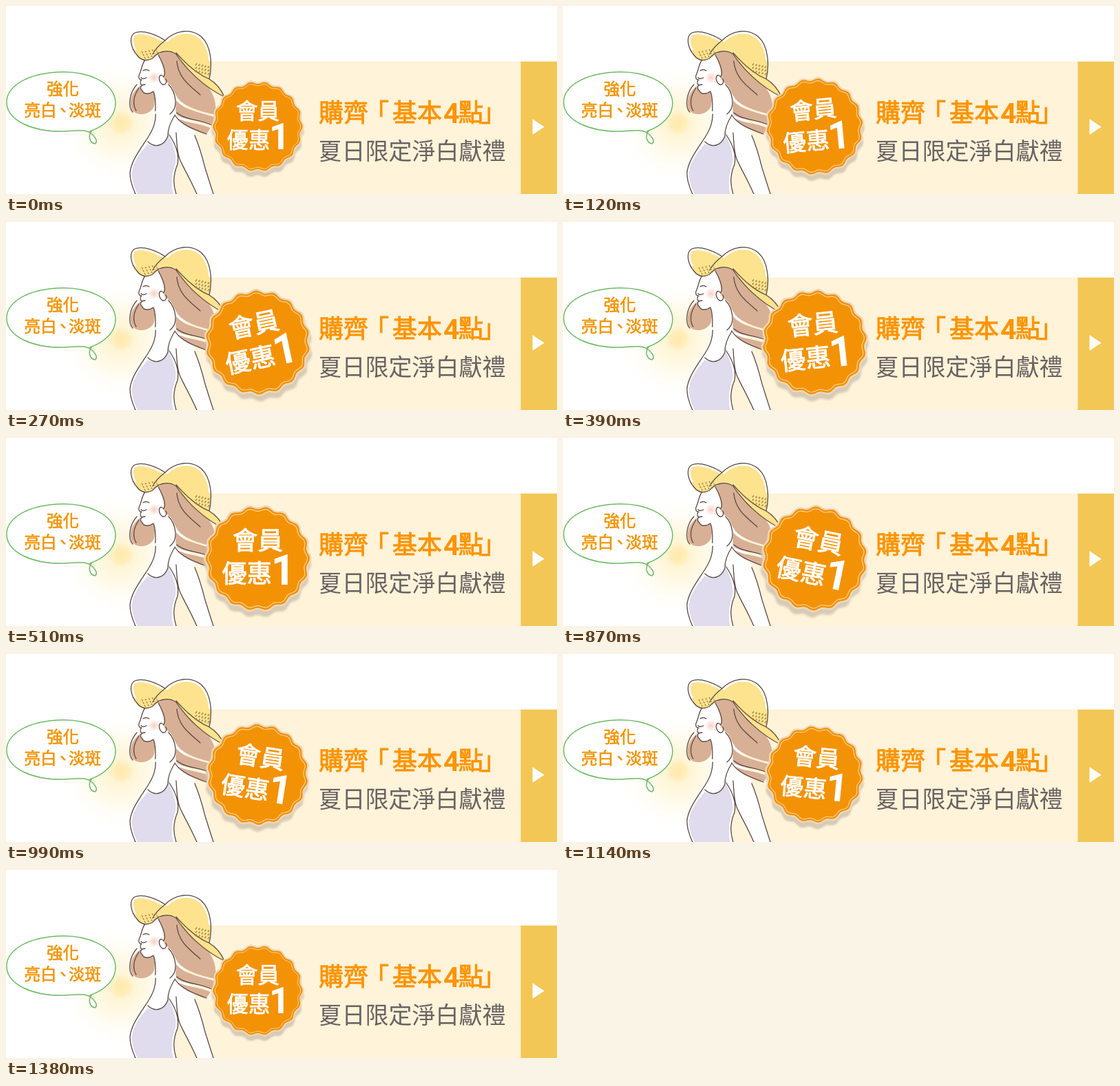
An HTML page for the animation above (2350 ms loop, 800 px wide and 273 px high).

```html
<!DOCTYPE html>
<html lang="zh-Hant">
<head>
<meta charset="utf-8">
<title>會員優惠</title>
<style>
html, body { margin: 0; width: 100%; height: 100%; overflow: hidden; background: #fff; }
svg { display: block; width: 100%; height: 100%; }
text { font-family: "Noto Sans CJK TC", "Noto Sans CJK", sans-serif; white-space: pre; }
.num { font-family: Roboto, "Noto Sans", sans-serif; font-weight: 700; }
.medium text:not(.num) { stroke: currentColor; stroke-width: .026em; }
.medium { fill: currentColor; }
.ink { fill: none; stroke: #5c4a46; stroke-width: 1.3; stroke-linecap: round; stroke-linejoin: round; }
.gap { fill: none; stroke: #fff; stroke-width: 7; }
.skin { fill: #fff; }
.hair { fill: #d8b095; }
</style>
</head>
<body>
<svg viewBox="0 0 800 273">
  <defs>
    <radialGradient id="glow">
      <stop offset="0" stop-color="#ffe9ac"/>
      <stop offset=".12" stop-color="#ffedb9"/>
      <stop offset=".2" stop-color="#fff5d6"/>
      <stop offset=".5" stop-color="#fffaea"/>
      <stop offset="1" stop-color="#fff" stop-opacity="0"/>
    </radialGradient>
    <radialGradient id="blush">
      <stop offset="0" stop-color="#fbcfc4"/>
      <stop offset="1" stop-color="#fbcfc4" stop-opacity="0"/>
    </radialGradient>
    <filter id="soft"><feGaussianBlur stdDeviation="1.2"/></filter>
  </defs>

  <!-- panel -->
  <rect x="243" y="80.600" width="505" height="193" fill="#fff3d9"/>
  <rect x="747.400" y="80.600" width="53" height="193" fill="#f2c755"/>
  <path d="M764.500 164L781.500 175.500L764.500 187Z" fill="#fff"/>
  <g class="medium" font-size="36" color="#ff9400">
    <text x="454" y="168">購齊</text>
    <text x="520" y="168">「</text>
    <text x="561" y="168">基本</text>
    <text class="num" x="635" y="170" font-size="41">4</text>
    <text x="657" y="168">點</text>
    <text x="690" y="168">」</text>
  </g>
  <text x="453.500" y="223" font-size="34" fill="#6a6262" style="font-weight:300">夏日限定淨白獻禮</text>

  <circle cx="167" cy="170" r="90" fill="url(#glow)"/>

  <!-- speech bubble -->
  <path d="M122 182C146 173 160 158 159 139C156 110 118 94 76 96C32 98 0 116 1 141C2 166 38 183 84 182C100 181 114 179 122 184C130 190 134 197 129 200C123 199 118 190 124 182"
        fill="#fff" stroke="#6dbb63" stroke-width="1.5" stroke-linecap="round"/>
  <g class="medium" font-size="23.500" color="#f39200">
    <text x="59" y="129">強化</text>
    <text x="26.500" y="160">亮白</text>
    <text x="71" y="160">、</text>
    <text x="91" y="160">淡斑</text>
  </g>

  <!-- torso and arm, with the panel showing between them -->
  <path class="skin" d="M215 125L240 84L275 190C284 210 290 235 301 273H277C268 252 257 236 251 222C244 240 242 256 247 273H188C183 262 180 254 180 243C181 226 195 208 206 191C213 180 219 168 217 150Z"/>
  <path d="M206 200C196 212 184 226 183 243C183 256 187 265 191 273H243C239 260 241 245 245 232C249 218 244 203 236 188C231 202 216 207 206 200Z" fill="#e0dbed"/>
  <path class="ink" d="M217 150C219 168 213 180 206 191C195 208 181 226 180 243C180 254 183 262 188 273M206 197C216 207 230 203 235 189C235 178 239 168 245 159M237 187C246 201 252 214 249 230C243 244 242 258 247 273M247 184C248 198 248 211 252 222C258 236 268 252 277 273M274 188C281 204 285 219 289 235L301 273"/>

  <!-- hair and face -->
  <path class="hair" d="M194 116C188 122 182 128 181 138C180 149 185 156 194 157C204 158 211 153 215 146L218 122Z"/>
  <path class="ink" d="M190 114C180 125 176 145 184 154M193 119C184 132 184 144 189 152"/>
  <path class="skin" d="M207 72C199 81 196 87 196 94C195 98 192 101 192 104C193 106 195 107 196 108C194 111 195 113 196 115C195 119 196 121 198 123C200 129 207 129 214 125C217 134 217 145 216 157L244 150L240 84L220 66Z"/>
  <path class="ink" d="M204 75C197 84 197 91 195 96C194 99 192 102 193 104C193 106 195 107 197 107C194 110 195 113 197 115C194 118 196 122 198 123C200 129 209 128 214 124C218 134 217 146 217 152M197 115L202 114M196 104C198 106 201 106 204 104M199 94C202 92 205 92 208 94"/>
  <circle cx="215" cy="104" r="9" fill="url(#blush)"/>
  <path class="hair" d="M221 71C228 64 240 64 248 71C260 88 274 103 292 116C301 126 306 140 304 158C286 154 266 149 253 138C245 130 244 121 238 114C233 111 228 107 229 102C231 96 228 86 221 71Z"/>
  <path class="hair" d="M247 137C258 150 276 153 302 161L300 172C282 164 262 168 248 158C245 152 247 144 247 137Z"/>
  <path class="hair" d="M250 163C262 170 280 170 297 177L291 186C278 180 261 178 250 163Z"/>
  <path class="ink" d="M221 71C229 85 233 96 229 103C222 95 220 108 226 113C230 117 235 111 232 106M236 114C242 120 245 127 246 137C247 147 243 153 238 157M248 80C250 104 266 115 282 129M245 158C253 172 272 179 291 186M248 155C263 167 282 164 299 173"/>

  <!-- hat -->
  <path d="M231 50C219 42 199 34 187 39C178 44 181 61 190 71C195 78 203 81 213 76C219 67 234 62 247 70C261 91 285 116 317 132C312 120 305 112 295 106C300 85 298 58 284 45C268 31 245 36 231 50Z" fill="#fde38d"/>
  <path class="gap" d="M231 50C219 42 199 34 187 39C180 42 180 54 186 65M231 50C245 36 268 31 284 45C292 53 297 65 298 80"/>
  <path class="ink" d="M231 50C219 42 199 34 187 39C178 44 181 61 190 71C195 78 203 81 213 76C220 66 235 62 247 70C261 91 285 116 317 132C312 120 305 112 295 106C300 85 298 58 284 45C268 31 245 36 231 50C223 56 217 62 213 70M247 68C262 85 278 99 295 106"/>
  <path id="weave" fill="none" stroke="#a08245" stroke-width="1.400"/>

  <g id="badge">
    <path class="seal" transform="translate(0 7) scale(1.03)" fill="#d8cbb6" filter="url(#soft)"/>
    <path class="seal" transform="scale(1.035)" fill="#ecd9bd"/>
    <path class="seal" fill="#f39205"/>
    <path class="seal" transform="scale(.955)" fill="none" stroke="#fbd7a0" stroke-width="1"/>
    <g class="medium" color="#fff" font-size="31.500">
      <text x="-31.500" y="-11.500">會員</text>
      <text x="-45" y="30.500">優惠</text>
      <text class="num" x="16.500" y="33" font-size="53">1</text>
    </g>
  </g>
</svg>
<script>
const badge = document.getElementById("badge");
const STEP = 30, LOOP = 2350;
// [time in ms, scale, rotation in degrees]
const KEYS = [[0, 1, 0], [270, 1.16, -12], [510, 1.16, 0], [870, 1.16, 11.5], [1380, 1, 0], [LOOP, 1, 0]];

function sealPath(bumps, radius, depth) {
  const points = [];
  for (let i = 0; i < 360; i++) {
    const a = i * Math.PI / 180;
    const r = radius + depth * Math.cos(bumps * a);
    points.push((r * Math.cos(a)).toFixed(2) + " " + (r * Math.sin(a)).toFixed(2));
  }
  return "M" + points.join("L") + "Z";
}

// Short slanted stitches in rows on each side of the brim
function weavePath() {
  let d = "";
  for (let i = 0; i < 5; i++) {
    for (let row = 0; row < 3; row++) {
      d += `M${197 + i * 5 + row * 2} ${66 + row * 4 - i}l1.500 2.500`;
      d += `M${275 + i * 4.5} ${86 + row * 5 + i}l2 -2.500`;
    }
  }
  return d;
}

function pose(t) {
  const i = KEYS.findIndex(k => k[0] > t);
  const [a, b] = [KEYS[i - 1], KEYS[i]];
  const p = (t - a[0]) / (b[0] - a[0]);
  return [1, 2].map(n => a[n] + (b[n] - a[n]) * p);
}

document.querySelectorAll(".seal").forEach(s => s.setAttribute("d", sealPath(18, 63.5, 1.6)));
document.getElementById("weave").setAttribute("d", weavePath());

const start = performance.now();
function draw() {
  const t = Math.floor((performance.now() - start) % LOOP / STEP) * STEP;
  const [scale, angle] = pose(t);
  badge.setAttribute("transform", `translate(365.5 175) rotate(${angle}) scale(${scale})`);
  requestAnimationFrame(draw);
}
draw();
</script>
</body>
</html>
```
